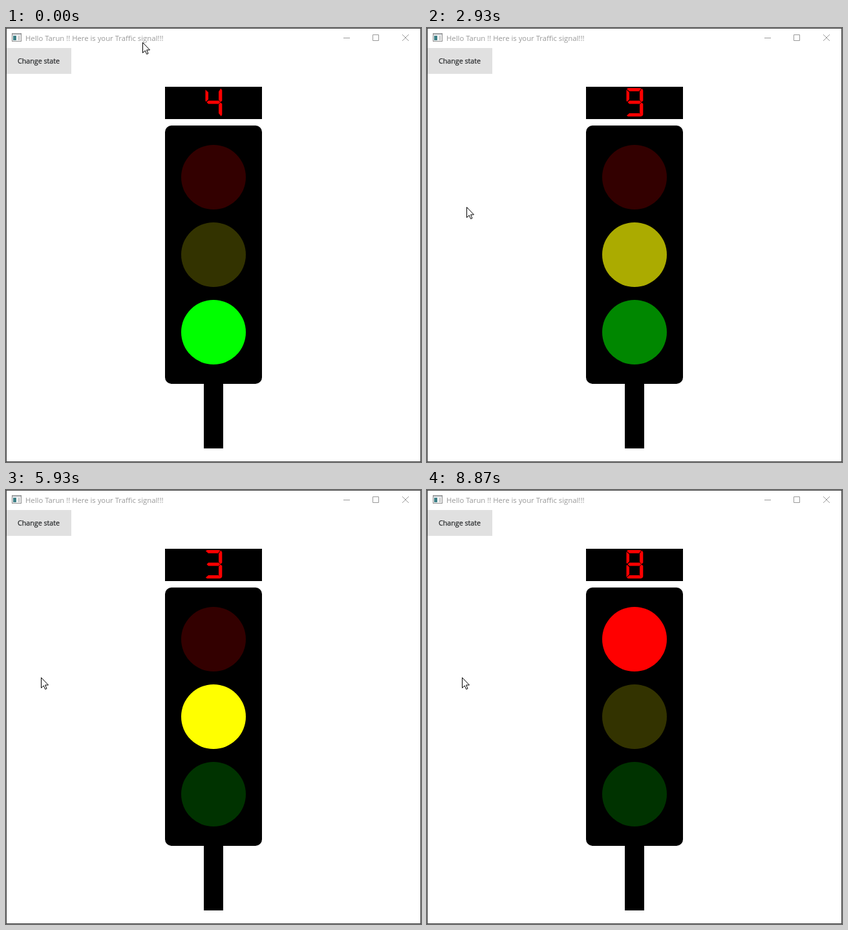
An HTML page that plays this animation: 642 by 672 pixels, repeating every 9190 ms.

```html
<!DOCTYPE html>
<html lang="en">
<head>
<meta charset="utf-8">
<title>Traffic signal</title>
<style>
  html, body { margin: 0; width: 100%; height: 100%; overflow: hidden; background: #fff; }
  svg { display: block; }
  text { font-family: "Open Sans", "Noto Sans", sans-serif; white-space: pre; }
</style>
</head>
<body>
<svg width="642" height="672" viewBox="0 0 642 672">
  <rect x=".5" y=".5" width="641" height="671" fill="#fff" stroke="#444"/>

  <!-- title bar -->
  <g shape-rendering="crispEdges">
    <rect x="9.5" y="8.5" width="14" height="12" fill="#fff" stroke="#8a8a8a"/>
    <path d="M10 9h13v2h-13z" fill="#c4c8cc"/>
    <path d="M11 12h5v7h-5z" fill="#3d7f86"/>
    <path d="M18 12h4v7h-4z" fill="#d4d4d4"/>
  </g>
  <text x="30" y="20" font-size="11.3" fill="#999">Hello Tarun !! Here is your Traffic signal!!!</text>
  <g fill="none" stroke="#999">
    <path d="M522 15.5h10M567.5 10.5h9v9h-9z"/>
    <path d="M613 10l10 10M623 10l-10 10"/>
  </g>

  <rect x="1" y="31" width="100" height="40" fill="#e0e0e0"/>
  <text x="18" y="55" font-size="10.7" fill="#26282a" stroke="#26282a" stroke-width=".25">Change state</text>

  <!-- signal -->
  <rect x="246" y="91" width="150" height="50"/>
  <rect x="246" y="151" width="150" height="400" rx="10"/>
  <rect x="306" y="550" width="30" height="101"/>
  <circle class="lamp" cx="321" cy="231" r="50"/>
  <circle class="lamp" cx="321" cy="351" r="50"/>
  <circle class="lamp" cx="321" cy="471" r="50"/>
  <g id="counter" fill="#f00"></g>

  <path id="cursor" d="M.5 .5V16.5L4.2 13L6.7 18.5L9 17.5L6.6 12H11.5Z" fill="#fff" stroke="#000"/>
</svg>
<script>
const LOOP = 9190, STEP = 200 / 3, FADE = 909;
const TO_YELLOW = 2400, TO_RED = 7867;

// Frame indices at which the counter ticks down
const ticks = [6, 13, 21, 28, 36, 44, 51, 59, 66, 73, 81, 89, 96, 103, 111, 118, 126, 133];

const segments = {
  a: 'M309 94.5L311 93H330L331.3 94L328 98H313Z',
  b: 'M332.4 93.6L334.3 96.5V112.5L332 114.7L329 111.5V98.5Z',
  c: 'M332 115.3L334.3 117.5V134L332.8 136.8L329 132V118.5Z',
  d: 'M313 132H328.5L332.5 136L331 137H311L309 135.5Z',
  e: 'M309.8 116L313 119.5V130.5L308.5 135V117Z',
  f: 'M308.5 95.5L313 99.5V110.5L309.8 114L308.5 113Z',
  g: 'M310.5 115L313 112.5H329L331.5 115L329 117.5H313Z'
};
const digits = ['abcdef', 'bc', 'abged', 'abgcd', 'fgbc', 'afgcd', 'afgecd', 'abcf', 'abcdefg', 'abcdfg'];

const lamps = document.querySelectorAll('.lamp');
const counter = document.getElementById('counter');
const cursor = document.getElementById('cursor');

const clamp = x => Math.min(1, Math.max(0, x));
const smooth = x => x * x * (3 - 2 * x);
const progress = (t, from, length) => clamp((t - from) / length);

function digit(n, dx) {
  const d = [...digits[n]].map(s => segments[s]).join('');
  return `<path transform="translate(${dx})" d="${d}"/>`;
}

function showCount(n) {
  counter.innerHTML = n === 10 ? digit(1, -26.3) + digit(0, 5.3) : digit(n, n === 1 ? -10.5 : 0);
}

function showLamps(t) {
  const yellow = progress(t, TO_YELLOW, FADE), red = progress(t, TO_RED, FADE);
  const levels = [red, yellow - red, 1 - yellow].map(p => Math.round(51 + 204 * p));
  const [r, y, g] = levels;
  [`${r},0,0`, `${y},${y},0`, `0,${g},0`].forEach((c, i) => lamps[i].setAttribute('fill', `rgb(${c})`));
}

function showCursor(t) {
  const p = smooth(progress(t, 800, 800)), q = smooth(progress(t, 4867, 780));
  const x = Math.round(211 - 150 * p - 7 * q);
  const y = Math.round(22 + 255 * p + 13 * q);
  cursor.setAttribute('transform', `translate(${x} ${y})`);
}

function draw(now) {
  const frame = Math.floor((now % LOOP + 5) / STEP);
  const t = frame * STEP;
  const ticked = ticks.filter(k => k <= frame).length;
  showCount((15 - ticked + 11 - 0) % 11);
  showLamps(t);
  showCursor(t);
}

const start = performance.now();
function loop() {
  draw(performance.now() - start);
  requestAnimationFrame(loop);
}
loop();
</script>
</body>
</html>
```
